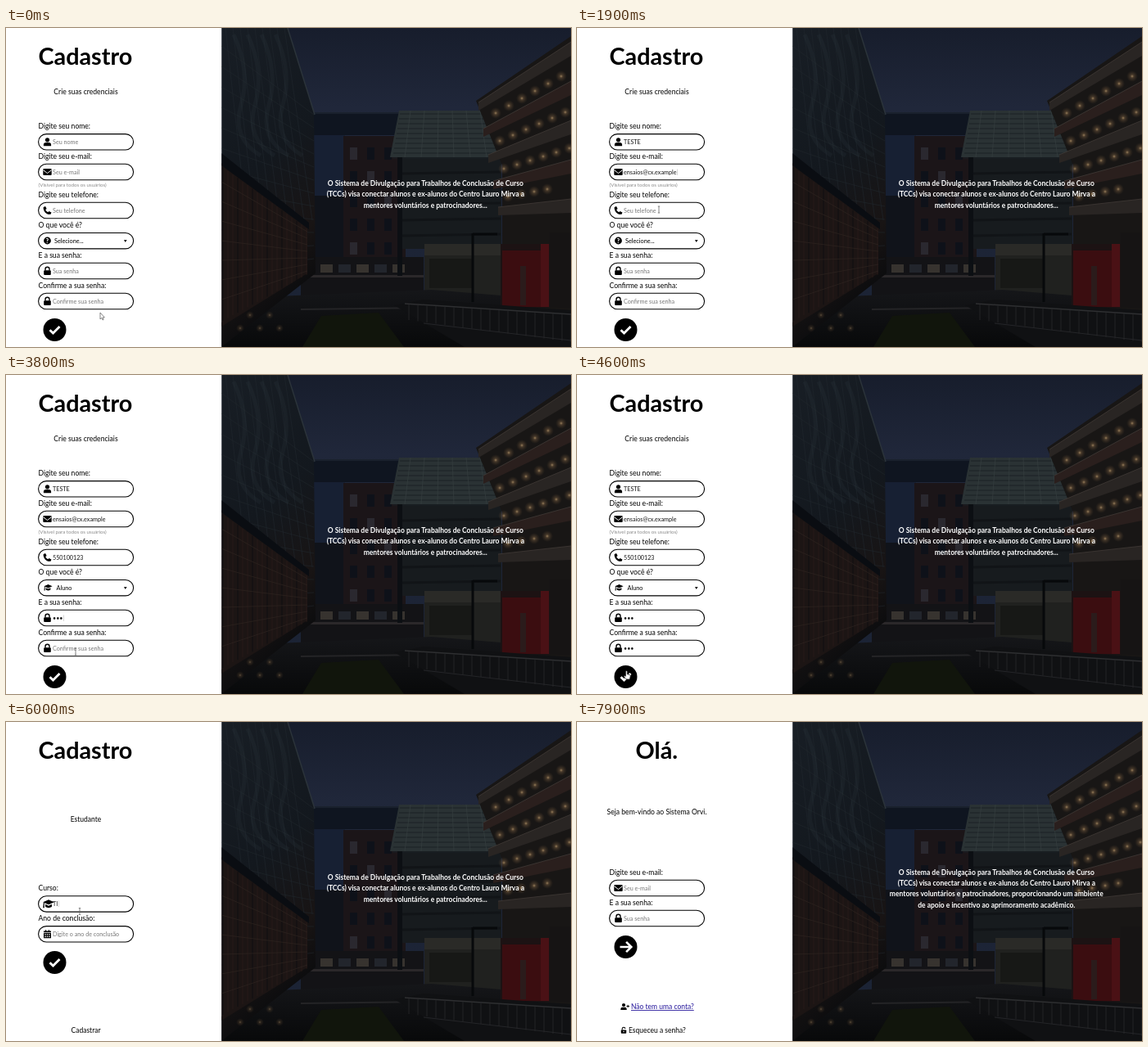
Animation, 690 px wide and 390 px high, one loop 8 s. Source, as an HTML page:

```html
<!DOCTYPE html>
<html lang="pt-BR">
<head>
<meta charset="utf-8">
<title>Cadastro</title>
<style>
  html, body { margin: 0; width: 100%; height: 100%; overflow: hidden; background: #fff; }
  svg { display: block; width: 690px; height: 390px; font-family: Lato, "Open Sans", sans-serif; }
</style>
</head>
<body>
<svg viewBox="0 0 690 390">
  <defs>
    <linearGradient id="sky" x2="0" y2="1">
      <stop stop-color="#171d2c"/><stop offset=".25" stop-color="#20273a"/><stop offset="1" stop-color="#1a2233"/>
    </linearGradient>
    <linearGradient id="glass" x2=".25" y2="1">
      <stop stop-color="#181e25"/><stop offset=".5" stop-color="#13181e"/><stop offset=".8" stop-color="#181414"/><stop offset="1" stop-color="#0a0b0d"/>
    </linearGradient>
    <linearGradient id="ground" x2="0" y2="1">
      <stop stop-color="#151619"/><stop offset="1" stop-color="#08090a"/>
    </linearGradient>
    <radialGradient id="glow">
      <stop stop-color="#c9a878" stop-opacity=".75"/><stop offset=".3" stop-color="#8a6b49" stop-opacity=".4"/><stop offset="1" stop-color="#60482f" stop-opacity="0"/>
    </radialGradient>
    <clipPath id="photoBox"><rect x="263.5" width="426.5" height="390"/></clipPath>
  </defs>
  <g id="photo" clip-path="url(#photoBox)"></g>
  <g id="screen"></g>
</svg>
<script>
const LOOP = 8000, STEP = 100;
const $ = id => document.getElementById(id);
const range = (n, draw) => Array.from({ length: n }, (_, i) => draw(i)).join('');
const rect = (x, y, w, h, fill, extra = '') =>
  `<rect x="${x}" y="${y}" width="${w}" height="${h}" fill="${fill}" ${extra}/>`;
const poly = (points, fill) => `<polygon points="${points}" fill="${fill}"/>`;
const line = (x1, y1, x2, y2, stroke, width = 1) =>
  `<path d="M${x1} ${y1}L${x2} ${y2}" stroke="${stroke}" stroke-width="${width}"/>`;
const text = (x, y, size, content, extra = '') =>
  `<text x="${x}" y="${y}" font-size="${size}" ${extra}>${content}</text>`;
const centered = (x, y, size, content, extra = '') =>
  text(x, y, size, content, `text-anchor="middle" ${extra}`);

// Dim evening view of a courtyard between buildings.
$('photo').innerHTML =
  rect(263, 0, 427, 390, 'url(#sky)') +
  // far brick building
  rect(376, 126, 38, 100, '#172033') +
  rect(376, 205, 36, 130, '#10131a') +
  rect(412, 132, 76, 170, '#1b1518') +
  range(15, i => rect(420 + i % 3 * 21, 146 + Math.floor(i / 3) * 29, 9, 15, i % 4 ? '#0e1119' : '#2a282f')) +
  rect(360, 280, 150, 65, '#131316') +
  range(6, i => rect(362 + i * 22, 289, 15, 10, i % 2 ? '#37332f' : '#22252c')) +
  rect(360, 302, 150, 3, '#2b282a') +
  // bridge and canopy
  poly('368,103 482,103 482,131 376,131', '#0f1520') +
  line(372, 104, 484, 104, '#252d3a') +
  rect(480, 155, 125, 115, '#171b1e') +
  poly('480,101 582,101 602,158 469,158', '#2a3234') +
  range(10, i => line(481 - i, 105 + i * 6, 584 + i * 2, 105 + i * 6, '#1b2125', 1.2)) +
  range(6, i => line(494 + i * 17, 101, 487 + i * 20, 158, '#363e3f', .7)) +
  rect(478, 158, 6, 145, '#0c0f13') +
  range(5, i => line(484, 178 + i * 19, 604, 176 + i * 19, '#111417', 3)) +
  // lit pavilion
  rect(511, 264, 93, 68, '#20211f') +
  rect(511, 264, 93, 14, '#2a2a27') +
  rect(517, 282, 52, 36, '#171816') +
  // ground
  poly('330,328 520,320 690,334 690,390 263,390 263,360', 'url(#ground)') +
  poly('385,352 455,348 486,390 362,390', '#11150c') +
  line(360, 344, 510, 342, '#242426', 2) +
  // glass building
  poly('263,0 344,0 376,103 378,300 263,390', 'url(#glass)') +
  range(12, i => line(263, 22 + i * 25, 376, 106 + i * 16, '#20272d', .6)) +
  range(9, i => line(268 + i * 9, 0, 294 + i * 10, 235, '#20272e', .6)) +
  range(4, i => `<path d="M${278 + i * 17} 8q21 45 9 86t24 62" fill="none" stroke="#3a454d" stroke-width="5" opacity=".15"/>`) +
  line(344, 0, 377, 106, '#2b333a', 1.5) +
  poly('263,165 368,245 368,300 263,365', '#1c1514') +
  range(18, i => line(265 + i * 6, 170 + i * 4.4, 265 + i * 6, 358 - i * 3.3, i % 3 ? '#2b1e1a' : '#0e0e10', .8)) +
  range(7, i => line(263, 188 + i * 24, 368, 249 + i * 8, '#2f2420', .7)) +
  poly('263,153 370,238 370,246 263,168', '#0a0d12') +
  range(5, i => `<circle cx="${286 + i * 12}" cy="${367 - i % 2 * 16}" r="5" fill="url(#glow)" opacity=".6"/>`) +
  // balconies
  poly('690,10 574,89 606,168 606,350 690,350', '#181615') +
  range(5, i => poly(`690,${17 + i * 48} ${577 + i * 6},${91 + i * 32} ${577 + i * 6},${101 + i * 32} 690,${34 + i * 48}`, i % 2 ? '#2a1f1d' : '#292523') +
    line(577 + i * 6, 91 + i * 32, 690, 17 + i * 48, '#403a37', .8)) +
  range(22, i => {
    const row = Math.floor(i / 6), col = i % 6;
    const x = 598 + row * 5 + col * 16, y = 104 + row * 34 - col * (9 - row * 2);
    return `<circle cx="${x}" cy="${y}" r="7" fill="url(#glow)"/>`;
  }) +
  // red wall, lamp post and fence
  rect(604, 264, 86, 78, '#1c1213') +
  rect(606, 272, 54, 69, '#3b0d10') +
  rect(653, 264, 10, 77, '#4a1115') +
  rect(628, 291, 7, 48, '#2b1b1b') +
  rect(664, 250, 26, 92, '#161414') +
  line(570, 251, 570, 335, '#07090b', 3) + line(570, 252, 600, 252, '#07090b', 3) +
  poly('474,339 510,332 690,345 690,390 560,390', '#101113') +
  line(487, 337, 690, 350, '#2e2f31', 1.5) + line(510, 361, 690, 382, '#242528') +
  range(19, i => line(492 + i * 11, 338 + i * .7, 492 + i * 11, 357 + i * 1.5, '#292a2d', .8));

// Icons fit a 10 px box around the origin.
const icons = {
  user: '<circle cy="-2.5" r="2.6"/><path d="M-4.6 5V3.6Q-4.6.8-1.8.8H1.8Q4.6.8 4.6 3.6V5z"/>',
  mail: '<rect x="-5.2" y="-4" width="10.4" height="8" rx="1"/><path d="M-5-2.2 0 1.5 5-2.2" fill="none" stroke="#fff"/>',
  phone: '<path d="M-4.8-4-2.4-5-.9-2-2.3-.8Q-1.3 1.3.8 2.3L2 .9 5 2.4 4 4.8Q-1.5 5.4-4 .4-5.2-2-4.8-4z"/>',
  question: '<circle r="4.4"/><text y="2.5" font-size="7" font-weight="900" text-anchor="middle" fill="#fff">?</text>',
  lock: '<rect x="-4.3" y="-.8" width="8.6" height="5.8" rx="1"/><path d="M-2.5-.5V-2.2a2.5 2.5 0 0 1 5 0V-.5" fill="none" stroke="#000" stroke-width="1.4"/>',
  unlock: '<rect x="-4.3" y="-.8" width="8.6" height="5.8" rx="1"/><path d="M-2.5-.5V-2.2a2.5 2.5 0 0 1 5-.4" fill="none" stroke="#000" stroke-width="1.4"/><circle cy="2" r="1" fill="#fff"/>',
  cap: '<path d="M-6-2 0-4.6 6-2 0 .6zM-3.4.2 0 1.8 3.4.2V3Q0 5-3.4 3zM-5.4-1.5h.9V4h-1.4z"/>',
  calendar: '<path d="M-4.5-3.8h2V-5h1.2v1.2h2.6V-5h1.2v1.2h2V-2h-9zM-4.5-1.4h9V5h-9z"/><path d="M-3.2.6H3.2M-3.2 3H3.2" stroke="#fff" stroke-width="1.3" stroke-dasharray="1.4 1.1"/>',
  mentor: '<circle cx="-2.8" cy="-.7" r="1.8"/><path d="M-5.5 4.5Q-5.4 1.5-2.8 1.5T0 4.5z"/><path d="M-3.2-4H5V2.3H.8" fill="none" stroke="#000" stroke-width="1.2"/>',
  sponsor: '<circle cx="1" cy="-2.6" r="1.9"/><path d="M-5 1.3h3l2 .8h2.3L5 .4 5.6 1.5 2.7 4.2H-5z"/>',
  graduate: '<path d="M-4.4-3.6 0-5 4.4-3.6 0-2.2z"/><circle cy="-1.3" r="2.3"/><path d="M-4 5Q-4 1.6-1.5 1.4L0 3 1.5 1.4Q4 1.6 4 5z"/>',
  check: '<path d="M-6 .2-2 4.1 6-3.9" fill="none" stroke="#fff" stroke-width="2.8"/>',
  arrow: '<path d="M-7 0H6.5M.6-6.2 6.8 0 .6 6.2" fill="none" stroke="#fff" stroke-width="2.6"/>',
};
const icon = (name, x, y, scale = 1) =>
  `<g transform="translate(${x} ${y}) scale(${scale})">${icons[name]}</g>`;

const title = (x, content) => text(x, 45, 28.8, content, 'font-weight="700"');
const label = (y, content) => text(39.5, y + 2.8, 8.6, content);
const box = (y, h, r) => rect(39.6, y, 116, h, '#fff', `rx="${r}" stroke="#000" stroke-width="1.1"`);
const field = (y, iconName, hint, value = '') =>
  box(y - 9.7, 19.4, 9.7) +
  text(57, y + 2.5, 7.2, value || hint, `fill="${value ? '#151515' : '#777'}"`) +
  icon(iconName, 50.5, y);
const button = (y, name) => `<circle cx="59.5" cy="${y}" r="14"/>` + icon(name, 59.5, y);

// Text typed from `start`, with a caret until `blur`.
function typed(content, t, start, pace, blur) {
  if (t < start) return '';
  const shown = content.slice(0, Math.floor((t - start) / pace) + 1);
  return shown + (t < blur ? '<tspan fill="#666" font-weight="300">|</tspan>' : '');
}

const roles = [['cap', 'Aluno'], ['mentor', 'Mentor'], ['sponsor', 'Patrocinador'], ['graduate', 'Ex-aluno']];

function accountForm(t) {
  const chosen = t >= 3100, open = t >= 2700 && !chosen;
  return title(39.5, 'Cadastro') +
    centered(97.5, 80.5, 8.6, 'Crie suas credenciais') +
    label(120, 'Digite seu nome:') +
    field(139.3, 'user', 'Seu nome', typed('TESTE', t, 600, 80, 1100)) +
    label(157, 'Digite seu e-mail:') +
    field(176, 'mail', 'Seu e-mail', typed('ensaios@cx.example', t, 1100, 40, 2000)) +
    text(39.5, 194, 6.2, '(Visível para todos os usuários)', 'fill="#8a8a8a"') +
    label(204, 'Digite seu telefone:') +
    field(223, 'phone', 'Seu telefone', typed('550100123', t, 2100, 50, 2700)) +
    label(240.7, 'O que você é?') +
    box(250.5, 19.4, 9.7) +
    icon(chosen ? 'cap' : 'question', chosen ? 51.5 : 50.5, 260, chosen ? .85 : 1) +
    text(chosen ? 61.5 : 59, 262.6, 7.3, chosen ? 'Aluno' : 'Selecione...') +
    poly('144,259 147.6,259 145.8,262', '#000') +
    label(278, 'E a sua senha:') +
    field(297, 'lock', 'Sua senha', typed('•••', t, 3500, 100, 3900)) +
    label(315, 'Confirme a sua senha:') +
    field(334, 'lock', 'Confirme sua senha', typed('•••', t, 4000, 100, 4500)) +
    (open ? box(272.6, 78, 4) + roles.map(([name, role], i) =>
      icon(name, 52, 283 + i * 19.1, .9) + text(61.5, 285.6 + i * 19.1, 7.8, role)).join('') : '') +
    button(369, 'check');
}

function studentForm(t) {
  return title(39.5, 'Cadastro') +
    centered(97.5, 122, 8.5, 'Estudante') +
    label(203, 'Curso:') +
    field(222.4, '', 'Seu curso', typed('TI', t, 5700, 200, 6200)).replace(/<g.*<\/g>$/, '') +
    icon('cap', 52, 222.6, 1.15) +
    label(240, 'Ano de conclusão:') +
    field(259.3, 'calendar', 'Digite o ano de conclusão', typed('2020', t, 6300, 100, 6800)) +
    button(294, 'check') +
    centered(97.5, 380, 8.5, 'Cadastrar');
}

function loginForm() {
  return title(71.5, 'Olá.') +
    centered(97.5, 112.5, 8.6, 'Seja bem-vindo ao Sistema Orvi.') +
    label(184, 'Digite seu e-mail:') + field(203, 'mail', 'Seu e-mail') +
    label(221, 'E a sua senha:') + field(240, 'lock', 'Sua senha') +
    button(275, 'arrow') +
    icon('user', 57, 348, .8) + line(60.5, 347.5, 64, 347.5, '#000') + line(62.2, 345.8, 62.2, 349.2, '#000') +
    text(66, 351, 8.5, 'Não tem uma conta?', 'fill="#24159a" text-decoration="underline"') +
    icon('unlock', 57, 377, .75) +
    text(63, 380, 8.5, 'Esqueceu a senha?');
}

const intro = ['O Sistema de Divulgação para Trabalhos de Conclusão de Curso',
  '(TCCs) visa conectar alunos e ex-alunos do Centro Lauro Mirva a'];
const shortIntro = [...intro, 'mentores voluntários e patrocinadores...'];
const longIntro = [...intro, 'mentores voluntários e patrocinadores, proporcionando um ambiente',
  'de apoio e incentivo ao aprimoramento acadêmico.'];
const caption = (lines, y) => lines.map((content, i) =>
  centered(512.3, y + i * 13.4, 8.5, content, 'fill="#fff" font-weight="700"')).join('');

const pointers = {
  arrow: '<path d="M0-4V4L1.8 2.3 3 5 4.2 4.4 3 1.9H5.4z" fill="#fff" stroke="#555" stroke-width=".7"/>',
  beam: '<path d="M-1.2-4H1.2M0-4V4M-1.2 4H1.2" stroke="#666" stroke-width=".8"/>',
  hand: '<path d="M-1.5-5Q-.4-5.8.3-4.7V-1.2L3.6-.3Q4.4 0 4.2 1L3.4 5H-.8L-3.8 1.4Q-3.4 0-1.5 1.2z" fill="#fff" stroke="#333" stroke-width=".8"/>',
};
// time, x, y, pointer shape
const route = [
  [0, 115, 352, 'arrow'], [100, 115, 352, 'arrow'], [500, 90, 140, 'beam'], [900, 90, 140, 'beam'],
  [1100, 95, 177, 'beam'], [1700, 95, 177, 'beam'], [1900, 100, 222, 'beam'], [2400, 100, 222, 'beam'],
  [2700, 95, 261, 'hand'], [2800, 95, 261, 'hand'], [3000, 90, 283, 'hand'], [3300, 85, 298, 'beam'],
  [3600, 85, 298, 'beam'], [3800, 85, 338, 'beam'], [4200, 85, 338, 'beam'], [4600, 61, 367, 'hand'],
  [4900, 61, 367, 'hand'], [5000, 60.5, 361, 'arrow'], [5200, 60.5, 361, 'arrow'], [5500, 90, 222, 'beam'],
  [5900, 90, 222, 'beam'], [6200, 90, 259, 'beam'], [6700, 90, 259, 'beam'], [7000, 67, 299, 'hand'],
  [7400, 67, 299, 'hand'],
];
function pointer(t) {
  const next = route.findIndex(stop => stop[0] > t);
  if (next < 0) return '';
  const [t0, x0, y0, shape] = route[next - 1], [t1, x1, y1] = route[next];
  const p = (t - t0) / (t1 - t0), ease = p * p * (3 - 2 * p);
  return `<g transform="translate(${x0 + (x1 - x0) * ease} ${y0 + (y1 - y0) * ease})">${pointers[shape]}</g>`;
}

let drawn = -1;
function frame() {
  const t = Math.floor(performance.now() % LOOP / STEP) * STEP;
  if (t !== drawn) {
    drawn = t;
    const atLogin = t >= 7400;
    const form = atLogin ? loginForm() : t >= 5000 ? studentForm(t) : accountForm(t);
    $('screen').innerHTML = form + (atLogin ? caption(longIntro, 186.6) : caption(shortIntro, 193)) + pointer(t);
  }
  requestAnimationFrame(frame);
}
frame();
</script>
</body>
</html>
```
